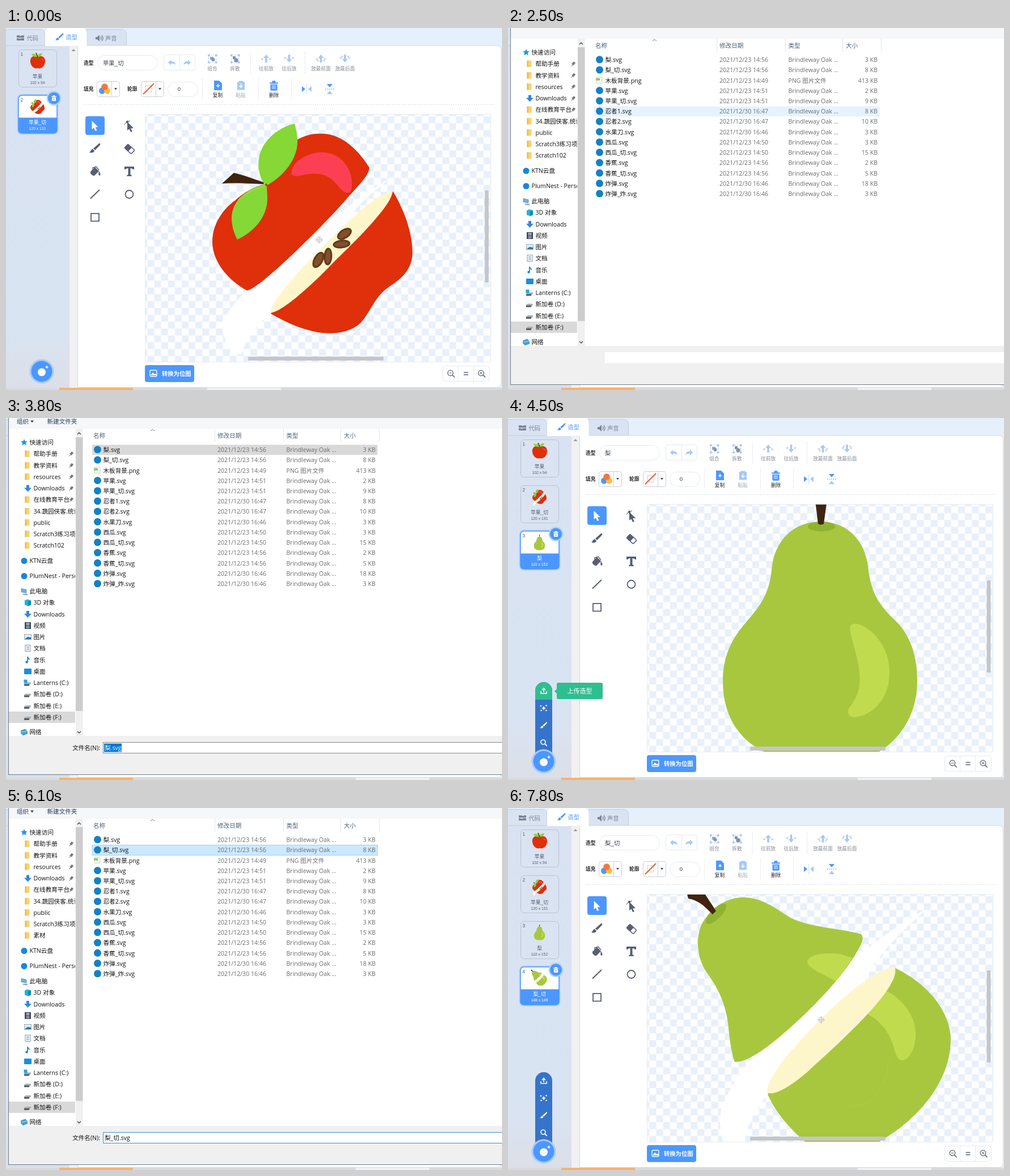
An HTML page that plays this animation: 875 by 640 pixels, repeating every 8 s.

```html
<!DOCTYPE html>
<html lang="zh">
<head>
<meta charset="utf-8">
<style>
html, body { margin: 0; width: 100%; height: 100%; overflow: hidden; background: #e5f0fa; }
svg { display: block; width: 100vw; height: 100vh; }
text { white-space: pre; font-family: "Liberation Sans", "Noto Sans CJK SC", "Noto Sans CJK", sans-serif; }
#dialog text { font-family: "Open Sans", "Noto Sans CJK SC", "Noto Sans CJK", sans-serif; }
.b { font-weight: 700; }
</style>
</head>
<body>
<script>
const BLUE = '#4c97ff', PALE = '#a3c9fb', INK = '#575e75', GREEN = '#2fbe8f';
const rect = (x, y, w, h, fill, more = '') => `<rect x="${x}" y="${y}" width="${w}" height="${h}" fill="${fill}" ${more}/>`;
const circle = (x, y, r, fill, more = '') => `<circle cx="${x}" cy="${y}" r="${r}" fill="${fill}" ${more}/>`;
const path = (d, fill, more = '') => `<path d="${d}" fill="${fill}" ${more}/>`;
const line = (d, stroke, width = 1, more = '') => path(d, 'none', `stroke="${stroke}" stroke-width="${width}" ${more}`);
const text = (x, y, s, size, fill, more = '') =>
  `<text x="${x}" y="${y + size * .36}" font-size="${size}" fill="${fill}" ${more}>${s}</text>`;
const mid = 'text-anchor="middle"', midBold = mid + ' class="b"';
const at = (x, y, body, more = '') => `<g transform="translate(${x} ${y}) ${more}">${body}</g>`;

// ---- Costume artwork ----
const RED = '#df2f0b', LEAF = '#85d836', STEM = '#40240f', CREAM = '#fef6cb', PEAR = '#a8c73f', SHINE = '#c0dc4e', DIMPLE = '#8fb331';
const seed = (x, y, rx, ry, angle) =>
  `<ellipse rx="${rx}" ry="${ry}" fill="#81502c" stroke="#633918" stroke-width="3" transform="translate(${x} ${y}) rotate(${angle})"/>`;

const cutApple =
  path('M682 262C590 320 395 470 382 522C380 548 394 560 400 578L416 576C424 548 445 522 467 504L620 345C590 330 650 290 682 262Z', '#fff') +
  path('M425 464C395 448 364 415 364 378C364 345 385 318 404 305C420 290 440 280 456 276C475 262 500 235 513 198C530 188 545 186 560 187C595 188 625 220 641 247C640 262 620 280 600 303C560 350 442 466 425 464Z', RED) +
  path('M504 254C505 236 535 218 562 220C592 222 613 250 610 282C608 294 600 294 592 286C582 276 575 262 553 258C530 255 515 265 507 261C503 259 503 257 504 254Z', '#fc3f52') +
  path('M402 256L381 275C405 273 430 275 454 276Q457 273 452 272C440 268 420 260 402 256Z', STEM) +
  path('M509 169C475 177 440 208 446 250C448 263 452 272 459 279C490 262 517 230 514 195C513 183 511 175 509 169Z', LEAF) +
  path('M459 275C430 283 400 300 398 335C398 350 402 362 408 374C435 362 462 335 461 300C461 290 460 282 459 275Z', LEAF) +
  line('M410 303Q430 286 457 280', '#b5df5a') + circle(459, 277, 2, RED) +
  path('M683 289C700 318 718 360 717 400C715 430 695 445 675 458C650 475 645 500 625 522C605 540 575 542 550 538C515 531 490 518 467 505C500 470 640 330 683 289Z', RED) +
  path('M682 288C660 292 620 325 580 365C530 415 468 480 466 503C480 507 535 460 580 412C630 364 682 310 682 288Z', CREAM) +
  seed(551, 410, 7, 14, 28) + seed(568, 404, 6, 14, 3) + seed(597, 364, 7, 13, 56) + seed(592, 382, 14, 6, -6);

const pear =
  path('M552 183C590 183 628 208 635 262C641 318 660 335 690 365C715 395 722 430 722 465C722 520 695 565 655 590Q551 625 447 588C400 562 379 518 379 465C379 425 392 395 415 367C445 332 461 312 465 268C470 215 505 183 552 183Z', PEAR) +
  '<ellipse cx="553" cy="192" rx="24" ry="8.5" fill="' + DIMPLE + '"/>' +
  path('M540 130H565L557 187Q552 190 547 187Z', STEM) +
  path('M603 372C603 362 615 362 625 367C655 383 673 415 673 450C673 495 645 525 612 529C600 529 597 520 602 512C620 490 622 470 620 450C617 420 605 390 603 372Z', SHINE);

const cutPear =
  path('M740 178C620 240 390 450 375 540Q372 570 380 590H415C425 555 440 525 460 505L640 330C600 310 690 220 740 178Z', '#fff') +
  path('M310 130H333L367 182L361 188C350 175 335 163 318 160Z', STEM) +
  path('M400 449C393 430 390 400 388 380C383 340 365 310 350 290C338 272 334 250 335 235C336 215 342 202 350 193C365 172 390 158 415 158C450 158 475 180 500 195C540 213 590 213 622 223C627 226 626 232 624 238C605 280 560 330 520 368C480 405 430 450 400 449Z', PEAR) +
  '<ellipse rx="24" ry="9" fill="' + DIMPLE + '" transform="translate(367 187) rotate(-45)"/>' +
  path('M345 153L367 182L361 188L335 163Z', STEM) +
  path('M528 272C530 258 560 255 585 258L608 265C598 280 590 292 578 306C560 295 530 285 528 272Z', SHINE) +
  path('M683 283C740 310 781 360 781 410C781 470 740 540 655 590Q585 615 524 590C495 565 470 535 458 506C520 430 620 320 683 283Z', PEAR) +
  path('M666 323C700 338 722 375 719 405C718 425 708 446 695 446C685 445 683 430 678 415C670 393 655 375 634 364C648 350 658 338 666 323Z', SHINE) +
  line('M671 440C673 490 645 528 600 528', '#b0ca49') +
  path('M680 281C650 285 600 325 550 375C500 425 458 475 457 500C460 512 490 500 530 465C590 410 690 320 683 284Q682 281 680 281Z', CREAM);

const appleThumb =
  path('M56 51C47 47 42 53 43 60C44 68 50 73 56 71C62 73 68 68 69 60C70 53 64 47 56 51Z', RED) +
  path('M61 54Q66 53 67 59Q64 56 61 54Z', '#fc3f52') +
  path('M56 51C50 52 46 49 45 46C51 45 55 47 56 51C56 46 60 44 64 45C63 49 60 51 56 51Z', LEAF) + line('M56 51L53 44', STEM, 1.5);
const thumb = (id, y, scale, cx, cy) => `<use href="#${id}" transform="translate(55.5 ${y}) scale(${scale}) translate(${-cx} ${-cy})"/>`;

const costumes = [
  { name: '苹果', size: '102 x 94', art: appleThumb },
  { name: '苹果_切', size: '120 x 131', art: thumb('cutApple', 139, .071, 540, 355) },
  { name: '梨', size: '110 x 152', art: thumb('pear', 220, .057, 551, 365) },
  { name: '梨_切', size: '148 x 149', art: thumb('cutPear', 301, .06, 558, 380) }
];
const trash = (x, y, s, fill) => at(x, y,
  path('M-5-4H5V-2.5H-5ZM-2-6H2V-4H-2ZM-4.2-1.5H4.2V5Q4.2 6 3 6H-3Q-4.2 6-4.2 5Z', fill), `scale(${s})`);

function costumeTile({ name, size, art }, i, selected) {
  const y = 38 + i * 81, ink = selected ? '#fff' : INK;
  const box = selected
    ? rect(19.5, y - 2.5, 73, 72, '#b4d3fb', 'rx="8"') + rect(22, y, 68, 67, '#fff', 'rx="6"') +
      path(`M22 ${y + 39.5}H90V${y + 61}Q90 ${y + 67} 84 ${y + 67}H28Q22 ${y + 67} 22 ${y + 61}Z`, BLUE) +
      rect(22, y, 68, 67, 'none', `rx="6" stroke="${BLUE}" stroke-width="1.5"`)
    : rect(22.5, y + .5, 67, 66, '#d9e3f2', 'rx="6" stroke="#b7c2d3"');
  const bin = circle(84.5, y + 5, 13, '#b4d3fb') + circle(84.5, y + 5, 10.5, BLUE) + trash(84.5, y + 5, .85, '#fff') +
    line(`M83 ${y + 5.5}l3 3m0-3l-3 3`, BLUE, .9);
  return box + art + text(25.5, y + 8, i + 1, 8.5, INK) + text(55.5, y + 47.5, name, 8.7, ink, mid) +
    text(55.5, y + 59, size, 6.8, ink, mid) + (selected ? bin : '');
}

// ---- Editor ----
const brush = (x, y, s, fill) => at(x, y,
  path('M9-9Q10-8 8-5L0 3L-3 0L5-7Q8-10 9-9ZM-4 1L-1 4C-2 8-6 8-10 7C-7 5-8 2-4 1Z', fill), `scale(${s})`);
const lens = (x, y, r, stroke, w) => circle(x - 1, y - 1, r, 'none', `stroke="${stroke}" stroke-width="${w}"`) +
  line(`M${x + r * .6} ${y + r * .6}l${r * .7} ${r * .7}`, stroke, w * 1.2, 'stroke-linecap="round"');
const speaker = at(164, 18, path('M-6-2H-3L1-6V6L-3 2H-6Z', '#7b8499') + line('M3-3Q5 0 3 3M5-5Q9 0 5 5', '#7b8499', 1.3));
const codeIcon = path('M19 13h5l1 1h2l1-1h4v4h-13zM19 18h3l1 1h2l1-1h6v4h-13z', '#7b8499');
const arrowV = (x, y, dir, w, bars) => at(x, y, path('M0-7L5-1H1.8V7H-1.8V-1H-5Z', PALE) +
  line(`M-${w} 1h4M${w} 1h-4` + (bars ? 'M-7 4h3M7 4h-3' : ''), '#b2b8c4', 1.4), `scale(1 ${dir})`);
const label = (x, y, s, fill = '#858a99') => text(x, y, s, 8.7, fill, mid);
const groupIcon = (x, loose) => rect(x - 6.5, 48, 13, 13, 'none', `stroke="${PALE}" stroke-dasharray="2 1.5"`) +
  [[-8, 46.5], [5, 46.5], [-8, 59], [5, 59]].map(([dx, y]) => rect(x + dx, y, 3.5, 3.5, PALE)).join('') +
  (loose ? rect(x - 4, 50, 5, 5, '#8b90a0') + circle(x + 2, 57, 3.7, '#8b90a0') : rect(x - 4, 51, 6, 5, '#a0a5b2') + circle(x + 1.5, 56, 3, '#8b90a0'));
const pill = (x, y, w, h, r) => rect(x + .5, y + .5, w, h, '#fff', `rx="${r}" stroke="#e3eaf4"`);
const undo = path('M286 61L291 56V59Q298 58 299 65Q295 62 291 63V66Z', PALE);

const toolbar =
  text(137, 62, '造型', 8.7, '#222', 'class="b"') + pill(161, 48, 106, 26, 13) + '<text id="name" x="171" y="65.5" font-size="10.3" fill="#3d4252"></text>' +
  pill(278, 47, 55, 27, 4) + line('M306.5 48V74', '#e3eaf4') + undo + at(612, 0, undo, 'scale(-1 1)') +
  groupIcon(364) + groupIcon(404, true) + label(364, 72, '组合') + label(404, 72, '拆散') +
  arrowV(459, 54, 1, 9) + arrowV(499.5, 54, -1, 9) + arrowV(555.5, 54, 1, 9, 1) + arrowV(598, 54, -1, 9, 1) +
  label(459, 72, '往前放') + label(499.5, 72, '往后放') + label(555.5, 72, '放最前面') + label(598, 72, '放最后面') +
  line('M431.5 42V82M527.5 42V82M346.5 90V127M445.5 90V127M503.5 90V127M137 135.5H862', '#d7dce5', 1, 'stroke-dasharray="2 2"') +
  text(137, 108, '填充', 8.7, '#222', 'class="b"') + text(214, 108, '轮廓', 8.7, '#222', 'class="b"') +
  [160, 238].map(x => rect(x + .5, 94.5, 40, 27, '#fff', 'rx="4" stroke="#c9ced8"') + line(`M${x + 26.5} 95V121`, '#c9ced8') +
    path(`M${x + 31} 106h5l-2.5 3.5z`, '#444')).join('') +
  circle(169.5, 111, 5.5, BLUE) + circle(178.5, 111, 5.5, '#ffbf3f') + circle(174, 104, 5.8, '#f7743f') +
  rect(246, 102, 11, 11, '#fff', 'stroke="#ccc"') + line('M242 117L261 98', '#e8602c', 2) +
  pill(285, 95, 53, 26, 13) + text(305.5, 108, '0', 9.5, '#333', mid) +
  path('M367 93h9l5 5v12h-14z', BLUE) + line('M374 99v6m-3-3h6', '#fff', 1.6) + label(373.5, 118.5, '复制', '#222') +
  path('M408 95h3v-1.500h7v1.500h3v14.500h-13z', PALE) + line('M414.500 98v6m-3-2l3 3l3-3', '#fff', 1.4) + label(414, 118.5, '粘贴', '#a0a4b0') +
  trash(472.5, 102, 1.45, BLUE) + line('M470 101v7m2.500-7v7m2.500-7v7', '#fff', .9) + label(472.5, 118.5, '删除', '#222') +
  path('M522 103L528 108L522 113Z', BLUE) + path('M539 103L533 108L539 113Z', PALE) + line('M530.5 100V116', PALE, 1, 'stroke-dasharray="2 1.5"') +
  path('M566 99H576L571 105Z', BLUE) + path('M566 117H576L571 111Z', PALE) + line('M563 108H579', BLUE, 1, 'stroke-dasharray="2 1.5"');

const pointer = 'M-5-8L6 3L1 3.500L4 9L1 10L-1.500 4.500L-5 7Z';
const tools =
  rect(140, 156, 34, 33, BLUE, 'rx="4"') + at(156.5, 172, path(pointer, '#fff')) +
  at(219, 174, path(pointer, INK)) + circle(214, 166, 2.2, INK) + line('M209 171Q211 166 214 166L219 164', INK) +
  brush(157, 213, 1, INK) +
  at(218, 214, rect(-8, -4.5, 16, 9, '#fff', `rx="1.5" stroke="${INK}" stroke-width="1.6"`) + rect(-8, -4.5, 9, 9, INK, 'rx="1.5"'), 'rotate(42)') +
  path('M149 254L157 246L164 253L156 261Q153 262 149 257Z', INK) + line('M153 246V253M154 247l5-2l5 6', INK, 1.4) + path('M164 253Q168 259 165.500 261Q162 261 164 253Z', INK) +
  path('M209 245H226V250H224Q223 248 219.500 248V259L222 261V262H213V261L215.500 259V248Q212 248 211 250H209Z', INK) +
  line('M149.500 301L164.500 286.500', INK, 2, 'stroke-linecap="round"') + circle(217.5, 294, 7, 'none', `stroke="${INK}" stroke-width="1.8"`) +
  rect(150, 328, 14, 13.5, 'none', `stroke="${INK}" stroke-width="1.8"`);

const canvas =
  rect(245.5, 152.5, 610, 438, '#fff', 'stroke="#e6edf5" rx="2"') +
  `<g clip-path="url(#board)">${rect(246, 153, 609, 437, 'url(#checks)')}
   <use id="art"/>
   <g id="cross">${circle(552.5, 374.5, 4.2, 'none', 'stroke="#c3c6cc" stroke-width="1.3"') + line('M546 374.500h13M552.500 368v13', '#c3c6cc', 1.3)}</g></g>` +
  rect(844.5, 287, 7, 163, '#c4c6ca', 'rx="2.5"') + rect(427, 581, 239, 7, '#c4c6ca', 'rx="2.5"');

const footer =
  rect(245, 596, 87, 30, BLUE, 'rx="4"') + rect(254, 605, 12, 11, 'none', 'rx="2" stroke="#fff" stroke-width="1.3"') +
  path('M255 614l4-5l3 3l2-1l2 3z', '#fff') + text(275, 611.5, '转换为位图', 10.3, '#fff', 'class="b"') +
  pill(770, 597, 82, 27, 4) + line('M797.500 598V624M824.500 598V624', '#e3eaf4') +
  lens(785, 611, 4.8, INK, 1.2) + line('M781.500 610h5', INK) + lens(839, 611, 4.8, INK, 1.2) + line('M835.500 610h5m-2.500-2.500v5', INK) +
  line('M807.500 609h8m-8 4h8', INK, 1.5);

const menuY = i => 483 + i * 30.2;
const menu = `<g clip-path="url(#menuClip)">` + rect(48, 467, 30, 141, '#3574ca', 'rx="15"') +
  `<g clip-path="url(#pillClip)"><rect id="menuHover" x="48" width="30" height="30.500" fill="${GREEN}"/></g>` +
  line('M58 483v4h10v-4M63 485v-7m-3 3l3-3.500l3 3.500', '#fff', 1.6) +
  path('M63 509l1.200 2.800l2.800 1.200l-2.800 1.200l-1.200 2.800l-1.200-2.800l-2.800-1.200l2.800-1.200z', '#fff') +
  [[58, 509], [67.5, 508.5], [58.5, 517], [67.5, 517]].map(p => circle(...p, 1.3, '#fff')).join('') +
  brush(63, 543.5, .65, '#fff') + lens(63, 574, 4, '#fff', 1.7) + '</g>';

const addButton = circle(63, 607, 21.5, '#a8cbfa') + `<circle id="addFace" cx="63" cy="607" r="18.5"/>` +
  circle(63, 608.5, 7, '#fff') + line('M72 597v5m-2.500-2.500h5', '#fff', 1.5);

const editor =
  rect(0, 0, 875, 640, '#e5f0fa') + rect(0, 30, 127, 606, 'url(#side)') +
  path('M-1 31V2.500H60Q69 3 69 12V31Z', '#d9e3f2', 'stroke="#c3cddb"') +
  path('M142 31V2.500H204Q212.500 3 212.500 12V31Z', '#d9e3f2', 'stroke="#c3cddb"') +
  path('M126.500 31H866Q873.500 31 873.500 39V628Q873.500 635.500 866 635.500H126.500Z', '#fff', 'stroke="#d0d8e4"') +
  path('M69 32V9Q69 0 78 0H134Q142.500 0 142.500 9V32Z', '#fff') +
  codeIcon + text(36.5, 18, '代码', 10.3, '#7b8499') + brush(94.5, 16, .75, BLUE) + text(105.5, 16, '造型', 10.3, BLUE) +
  speaker + text(175, 18, '声音', 10.3, '#7b8499') +
  rect(112, 31, 14, 605, '#f1f1f1') + path('M115.500 41h7l-3.500-4z', '#999') +
  '<g id="tiles"></g>' + toolbar + tools + canvas + footer + menu + addButton +
  `<g id="tip">${path('M0-14.500', 'none')}<path id="tipBox" fill="${GREEN}"/><text id="tipText" text-anchor="middle" font-size="11" fill="#fff"></text></g>`;

// ---- File dialog ----
const SIZE = 10.6, ROW = 18.23;
const files = [['梨', 23, '14:56', 3], ['梨_切', 23, '14:56', 8], ['木板背景', 23, '14:49', 413], ['苹果', 23, '14:51', 2], ['苹果_切', 23, '14:51', 9],
  ['忍者1', 30, '16:47', 8], ['忍者2', 30, '16:47', 10], ['水果刀', 30, '16:46', 3], ['西瓜', 23, '14:50', 3], ['西瓜_切', 23, '14:50', 15],
  ['香蕉', 23, '14:56', 2], ['香蕉_切', 23, '14:56', 5], ['炸弹', 30, '16:46', 18], ['炸弹_炸', 30, '16:46', 3]];
const rowY = i => 56.3 + i * ROW;
const fileRow = ([name, day, time, kb], i) => {
  const y = rowY(i), png = name === '木板背景';
  const icon = png ? rect(156, y - 6, 10, 11, '#f4f8f1', 'stroke="#c5d3bd" stroke-width=".8"') + rect(155, y - 4, 7, 4, '#8cc474') : circle(161.5, y - .5, 6.5, '#1481c4');
  return icon + text(171.5, y, name + (png ? '.png' : '.svg'), SIZE, '#111') + text(373, y, `2021/12/${day} ${time}`, SIZE, '#6d6d6d') +
    text(494.5, y, png ? 'PNG 图片文件' : 'Brindleway Oak ...', SIZE, '#6d6d6d') + text(652, y, kb + ' KB', SIZE, '#6d6d6d', 'text-anchor="end"');
};

const icons = {
  star: y => path(`M32 ${y - 6}l1.700 4l4.300.3l-3.300 2.800l1 4.300l-3.700-2.400l-3.700 2.400l1-4.300l-3.300-2.800l4.300-.3z`, '#2196e3'),
  folder: y => rect(33.5, y - 6, 8, 11.5, '#f7d372', 'rx="1"') + rect(33.5, y - 6, 2.5, 11.5, '#eebd45'),
  down: y => path(`M36 ${y - 6}h5v5h4l-6.500 7l-6.500-7h4z`, '#3289d6'),
  dot: y => circle(32, y, 5.5, '#1687e0'),
  pc: y => path(`M27 ${y - 5}l9 2v6l-9-2z`, '#66b5e8', 'stroke="#6d8796" stroke-width=".8"') + line(`M30 ${y + 5}l8 1`, '#8a98a2', 2),
  cube: y => path(`M33 ${y - 4}l5-2l6 2v8l-5 2l-6-2z`, '#22b4d6') + path(`M39 ${y - 2}l5-2v8l-5 2z`, '#0d88ac'),
  film: y => rect(33, y - 6, 11, 12, '#3c4650') + rect(35.5, y - 5, 6, 4.5, '#95a9bd') + rect(35.5, y + .5, 6, 4.5, '#8293a8'),
  image: y => rect(32.5, y - 4.5, 12, 9, '#d9eefa', 'stroke="#8c9aa5" stroke-width=".8"') + path(`M33 ${y + 4}l5-4l6 1v3z`, '#2d77ad'),
  doc: y => rect(34, y - 6, 9, 11, '#fff', 'stroke="#8493a0"') + line(`M36 ${y - 3}h5m-5 2.500h5m-5 2.500h5`, '#5795bd'),
  note: y => line(`M38 ${y + 3}v-9q1 4 4 5`, '#1687d8', 1.7) + circle(36.5, y + 3.5, 2.2, '#1687d8'),
  desk: y => rect(32, y - 5, 13, 10, '#1790e0', 'rx="1"'),
  drive: y => path(`M32 ${y + 1}l3-2h9v2l-3 3h-9z`, '#a8adb2') + rect(32, y + 2, 9, 3, '#555b60'),
  system: y => icons.drive(y) + rect(31.5, y - 6, 6, 6, '#20a4e8'),
  net: y => path(`M26 ${y - 3}l8-3l4 4v5l-8 3l-4-4z`, '#4a9fcf') + line(`M27 ${y}l10-2`, '#bfe2f5')
};
const sidebar = [
  [43, 'star', '快速访问'], [63.5, 'folder', '帮助手册', 1], [84, 'folder', '教学资料', 1], [104, 'folder', 'resources', 1], [124.5, 'down', 'Downloads', 1],
  [144.5, 'folder', '在线教育平台', 1], [165, 'folder', '34.蔬园侠客.统计'], [185, 'folder', 'public'], [205, 'folder', 'Scratch3练习项目'],
  [225.5, 'folder', ''], [252.5, 'dot', 'KTN云盘'], [279.5, 'dot', 'PlumNest - Personal'], [306.5, 'pc', '此电脑'], [326.5, 'cube', '3D 对象'],
  [347, 'down', 'Downloads'], [367, 'film', '视频'], [387, 'image', '图片'], [407.5, 'doc', '文档'], [428, 'note', '音乐'], [448, 'desk', '桌面'],
  [468.5, 'system', 'Lanterns (C:)'], [488.5, 'drive', '新加卷 (D:)'], [509, 'drive', '新加卷 (E:)'], [529, 'drive', '新加卷 (F:)'], [555.5, 'net', '网络']
].map(([y, icon, name, pinned]) => {
  const top = ['star', 'dot', 'pc', 'net'].includes(icon);
  return icons[icon](y) + text(top ? 41.5 : 48.5, y, name, SIZE, '#111', name ? '' : 'id="recent"') +
    (pinned ? at(115, y, path('M-2-4H2V0L3 1.500H-3L-2 0ZM-.5 1.500H.5V5H-.5Z', '#777'), 'rotate(40)') : '');
}).join('');

const dialog =
  rect(4, 0, 871, 631, '#6f7a86') + rect(5, 0, 870, 19, '#f5f7f9') + rect(5, 19, 870, 543, '#fff') + rect(5, 562, 870, 68, '#f0f0f0') +
  rect(171, 573, 704, 19.5, '#fff') +
  `<g id="chrome">${text(19, 6.5, '组织', SIZE, '#1e395b') + path('M43 4.500h6l-3 3.500z', '#333') + text(72.5, 6.5, '新建文件夹', SIZE, '#1e395b') +
    text(166, 583, '文件名(N):', SIZE, '#111', 'text-anchor="end"')}<rect id="field" x="171.500" y="573.500" width="710" height="19" fill="#fff"/></g>
  <rect id="mark" x="173" y="575.500" width="31" height="15" fill="#0078d7"/><text id="fileName" x="174" y="586.800" font-size="${SIZE}"></text>
  <g id="content"><rect id="rowMark" x="152" width="503.500" height="18"/>` +
  rect(123, 19, 12.5, 543, '#f0f0f0') + rect(123, 34, 12.5, 484, '#cdcdcd') +
  line('M126 29l3-3l3 3M126 554l3 3l3-3', '#505050', 1.5) +
  line('M368.500 19V42M489.500 19V42M590.500 19V42M658.500 19V42', '#e5e5e5') + line('M255 23l3.500-3l3.500 3', '#777') +
  text(154, 31, '名称', SIZE, '#4c607a') + text(373, 31, '修改日期', SIZE, '#4c607a') + text(494.5, 31, '类型', SIZE, '#4c607a') + text(596, 31, '大小', SIZE, '#4c607a') +
  files.map(fileRow).join('') + `<g clip-path="url(#sideClip)">${rect(5, 519, 117, 20, '#d9d9d9') + sidebar}</g></g>`;

const clip = (id, shape) => `<clipPath id="${id}">${shape}</clipPath>`;
document.body.innerHTML = `<svg viewBox="0 0 875 640" preserveAspectRatio="none"><defs>
  <linearGradient id="side" x2="0" y2="1"><stop stop-color="#d8e2f2"/><stop offset=".82" stop-color="#d9e4f3"/><stop offset="1" stop-color="#dcdfe7"/></linearGradient>
  <pattern id="checks" x="552" y="374" width="24.200" height="24.200" patternUnits="userSpaceOnUse">${rect(0, 0, 12.1, 12.1, '#e8f0fb') + rect(12.1, 12.1, 12.1, 12.1, '#e8f0fb')}</pattern>
  ${clip('board', rect(246, 153, 609, 437, '#000')) + clip('sideClip', rect(5, 19, 117, 543, '#000')) +
    clip('pillClip', rect(48, 467, 30, 141, '#000', 'rx="15"')) + clip('menuClip', '<rect id="menuWindow" x="48" width="30"/>')}
  <g id="cutApple">${cutApple}</g><g id="pear">${pear}</g><g id="cutPear">${cutPear}</g></defs>
  ${editor}<g id="dialog">${dialog}</g>
  ${rect(0, 636, 875, 4, '#d7dbe0') + rect(94, 636, 130, 4, '#fbb06c')}<rect id="segment" y="636" width="130" height="4" fill="#edf2f7"/></svg>`;

// ---- Timeline ----
const $ = id => document.getElementById(id);
const set = (id, attrs) => { for (const key in attrs) $(id).setAttribute(key, attrs[key]); };
const show = (id, on) => set(id, { visibility: on ? 'inherit' : 'hidden' });
const between = (t, a, b) => t >= a && t < b;
const clamp = v => Math.max(0, Math.min(1, v));
let tileCount = 0;

function drawEditor(t) {
  const count = t < 4300 ? 2 : t < 7300 ? 3 : 4;
  if (count !== tileCount) {
    tileCount = count;
    $('tiles').innerHTML = costumes.slice(0, count).map((c, i) => costumeTile(c, i, i === count - 1)).join('');
    $('name').textContent = costumes[count - 1].name;
    set('art', { href: ['#cutApple', '#pear', '#cutPear'][count - 2] });
  }
  show('cross', count !== 3);
  set('segment', { x: t < 1700 ? 355 : 617 });

  const open = clamp((t - 850) / 250);
  set('menuWindow', { y: 608 - 141 * open, height: 141 * open });
  const onButton = between(t, 900, 1200);
  const item = t < 1200 ? -1 : t < 1300 ? 2 : t < 1500 ? 1 : t < 7400 ? 0 : -1;
  set('addFace', { fill: onButton ? GREEN : BLUE });
  show('menuHover', item >= 0);
  set('menuHover', { y: menuY(item) - 15.5 });
  show('tip', onButton || item >= 0);
  const tipText = onButton ? '选择一个造型' : ['上传造型', '随机', '绘制'][item] || '';
  const left = onButton ? 92 : 86, width = 37 + 11 * tipText.length, y = onButton ? 607 : menuY(item);
  set('tipBox', { d: `M${left - 4} ${y}l5-5v10zM${left + 3} ${y - 15}h${width - 6}q3 0 3 3v23q0 3-3 3h${6 - width}q-3 0-3-3v-23q0-3 3-3z` });
  set('tipText', { x: left + width / 2, y: y + 4 });
  $('tipText').textContent = tipText;
}

function drawDialog(t) {
  const second = t >= 5200, start = second ? 5200 : 2200, close = second ? 6900 : 3900;
  show('dialog', between(t, start, close + 200));
  set('dialog', { opacity: clamp(1 - (t - close + 50) / 200) });
  show('content', t >= start + 200);
  show('chrome', t >= start + 400);
  $('recent').textContent = second ? '素材' : 'Scratch102';

  const selectAt = second ? 6000 : 3200, selected = t >= selectAt;
  const row = second ? 1 : Math.max(0, 5 - Math.max(0, Math.floor((t - 2500) / 100)));
  const grey = !second && t >= 3800;
  show('rowMark', !second || t >= 5800);
  set('rowMark', { y: rowY(row) - 9, fill: grey ? '#d9d9d9' : selected ? '#cce8ff' : '#e5f3ff', stroke: selected && !grey ? '#99d1ff' : 'none' });

  const named = t >= selectAt + 100, marked = t >= (second ? 6700 : 3800);
  $('fileName').textContent = named ? (second ? '梨_切.svg' : '梨.svg') : '';
  set('fileName', { fill: marked ? '#fff' : '#111' });
  show('mark', marked);
  set('mark', { width: second ? 46 : 31 });
  set('field', { stroke: second && named ? '#3d8fc9' : '#858b91' });
}

function frame(now) {
  const t = now % 8000;
  drawEditor(t);
  drawDialog(t);
  requestAnimationFrame(frame);
}
requestAnimationFrame(frame);
</script>
</body>
</html>
```
